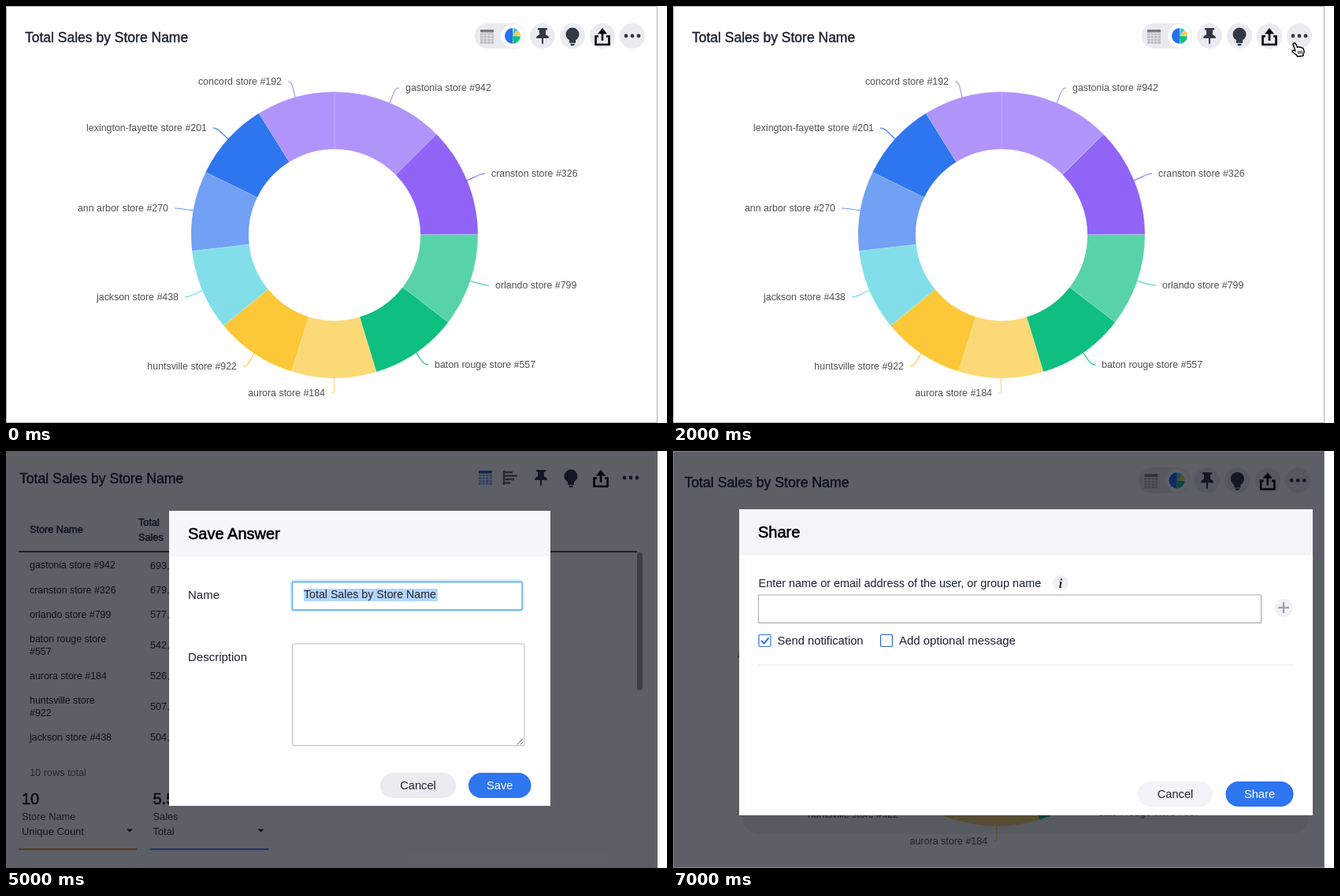
Recreate the animation shown at these times as an HTML page. Size 839 px wide and 530 px high, loop 8 s.

```html
<!DOCTYPE html>
<html lang="en">
<head>
<meta charset="utf-8">
<title>Save and share a chart</title>
<style>
html, body { margin: 0; width: 100%; height: 100%; overflow: hidden; background: #fff; }
svg { display: block; width: 839px; height: 530px; }
text { font-family: "Liberation Sans", Arial, sans-serif; fill: currentColor; white-space: pre; }
.medium { stroke: currentColor; stroke-width: .4px; }
.bold { stroke: currentColor; stroke-width: .6px; }
</style>
</head>
<body>
<svg id="stage" viewBox="0 0 839 530"></svg>
<script>
const INK = '#1d2233', ICON = '#323946', PALE = '#eaebf0', BLUE = '#2e75f0', GRAY = '#6b717e';
const CX = 417, CY = 291, R = 182, HOLE = 109;

// sales in thousands, colour, label, label x, label centre y
const stores = [
  [693, '#b094fa', 'gastonia store #942', 507, 104],
  [679, '#8f64f7', 'cranston store #326', 616, 213],
  [577, '#58d3a8', 'orlando store #799', 621, 355],
  [542, '#0ebf7f', 'baton rouge store #557', 544, 456],
  [526, '#fbd977', 'aurora store #184', 405, 492],
  [507, '#fcc838', 'huntsville store #922', 293, 458],
  [504, '#82dfe9', 'jackson store #438', 219, 370],
  [494, '#71a0f4', 'ann arbor store #270', 206, 257],
  [492, '#2e75f0', 'lexington-fayette store #201', 255, 155],
  [486, '#b094fa', 'concord store #192', 350, 96]
];
const total = stores.reduce((sum, [sales]) => sum + sales, 0);

const rect = (x, y, w, h, fill, more = '') =>
  `<rect x="${x}" y="${y}" width="${w}" height="${h}" fill="${fill}" ${more}/>`;
const circle = (x, y, r, fill) => `<circle cx="${x}" cy="${y}" r="${r}" fill="${fill}"/>`;
const fillPath = (d, fill) => `<path d="${d}" fill="${fill}"/>`;
const line = (d, stroke, width = 1, more = '') =>
  `<path d="${d}" fill="none" stroke="${stroke}" stroke-width="${width}" ${more}/>`;
const text = (x, middle, size, str, color = INK, more = '') =>
  `<text x="${x}" y="${middle + size * .35}" font-size="${size}" color="${color}" ${more}>${str}</text>`;
const group = (transform, content) => `<g transform="${transform}">${content}</g>`;
const zoom = (scale, x, y, content) => group(`translate(${x} ${y}) scale(${scale})`, content);
const MEDIUM = 'class="medium"', BOLD = 'class="bold"', CENTER = 'text-anchor="middle"';

function polar(angle, r, cx = CX, cy = CY) {
  const a = angle * Math.PI / 180;
  return [cx + r * Math.sin(a), cy - r * Math.cos(a)].map(v => v.toFixed(2)).join(' ');
}

function donut() {
  let from = 0, out = '';
  for (const [sales, color, label, x, y] of stores) {
    const to = from + 360 * sales / total, mid = (from + to) / 2;
    const right = mid < 180, side = right ? 1 : -1, endX = x - side * 8;
    out += `<path d="M${polar(from, R)}A${R} ${R} 0 0 1 ${polar(to, R)}L${polar(to, HOLE)}A${HOLE} ${HOLE} 0 0 0 ${polar(from, HOLE)}Z"
      fill="${color}" stroke="#fff" stroke-opacity=".3" stroke-width=".5"/>`;
    out += line(`M${polar(mid, R)}C${polar(mid, R + 13)} ${endX - side * 6} ${y} ${endX} ${y}`, color, 1.2);
    out += text(x, y, 12.4, label, '#505154', right ? '' : 'text-anchor="end"');
    from = to;
  }
  return out;
}

const tableIcon = (x, y, head, cells) => group(`translate(${x} ${y})`,
  rect(0, 0, 17, 3.5, head) +
  line('M0 6h17M0 9.6h17M0 13.2h17M0 16.6h17', cells, 2.6, 'stroke-dasharray="3.6 .87"'));

function pieIcon(x, y) {
  const wedge = (a, b, color) =>
    fillPath(`M${x} ${y}L${polar(a, 10, x, y)}A10 10 0 0 1 ${polar(b, 10, x, y)}Z`, color);
  return wedge(180, 360, '#2770ef') + wedge(5, 42, '#48c5e0') + wedge(46, 87, '#fcc838') + wedge(93, 176, '#0ebf7f');
}

// pin, bulb, export and dots
const actionIcons = dots =>
  fillPath('M675 28h12v2.5h-2v6q4 1 4 4.5h-16q0-3.5 4-4.5v-6h-2zM680 41h2v6l-1 2-1-2z', ICON) +
  circle(719, 36, 8.5, ICON) + fillPath('M715 42h8v5h-8zM716 48h6l-1.5 2.5h-3z', ICON) +
  line('M752 38.5h-3.5v10.5h17v-10.5h-3.5M757 44V32', '#000', 2.6) +
  fillPath('M757 28l6 7.5h-12z', '#000') +
  [787, 795, 803].map(x => circle(x, 38, 2.4, dots)).join('');

const frameLine = color => rect(.5, .5, 826, 529, 'none', `stroke="${color}"`);

const header = menuOpen =>
  text(24, 40, 17.5, 'Total Sales by Store Name', INK, MEDIUM) +
  rect(595, 22, 64, 32, PALE, 'rx="16"') + circle(643, 38, 15, '#fff') +
  tableIcon(602, 30, '#7b7d82', '#b9bbc0') + pieIcon(643, 38) +
  [681, 719, 757].map(x => circle(x, 38, 16, PALE)).join('') +
  circle(795, 38, 16, menuOpen ? ICON : PALE) + actionIcons(menuOpen ? '#fff' : ICON);

// icons are 16 px wide, drawn around 0,0
const menuItems = [
  ['Save', line('M-7.5-7.5h15v15h-15zM-4 0h8M0-4v8', GRAY, 1.8)],
  ['Copy and edit', rect(-3, -8, 11, 11, GRAY) + line('M-5-3h-2v10h10v-2', GRAY, 2)],
  ['Create view', line('M-7.5-7h15v14h-15zM-7.5-2.5h15M-2.5-7v14', GRAY, 1.8)],
  ['Delete', fillPath('M-6-7h3l1-1h4l1 1h3v2h-12zM-5-4h10l-1 12h-8z', GRAY)],
  ['Add formula', text(-7, -1, 18, 'f', GRAY, 'font-style="italic" class="bold"') + line('M0 2l6 6M6 2l-6 6', GRAY, 1.8)],
  ['Download', line('M0-8v10M-4.5-2l4.5 4.5 4.5-4.5M-6 7h12', GRAY, 1.8)],
  ['Replay search', line('M6-4a7.2 7.2 0 1 0 1 5', GRAY, 1.8) + fillPath('M-2-3.5l5 3.5-5 3.5zM8-6v5h-5z', GRAY)],
  ['Send feedback', fillPath('M8-7l-4 15-4-5-2 4-1-6-5-2z', GRAY)]
];

const menu = hover =>
  rect(628, 300, 181, 44, '#f1f1f2', 'rx="26" ry="16"') +
  rect(628, 68.5, 181, 265, '#fff', 'stroke="#e6e7ea" stroke-width=".7"') +
  (hover ? rect(628, 69, 181, 32, '#e4edfd') : '') +
  menuItems.map(([label, icon], i) =>
    group(`translate(655 ${85 + 32 * i})`, icon) + text(677, 85 + 32 * i, 14.7, label)).join('');

const shade = rect(0, 0, 827, 530, 'rgb(2,6,18)', 'fill-opacity=".64"');

const button = (x, y, w, label, fill, color) =>
  rect(x, y, w, 32, fill, 'rx="16"') + text(x + w / 2, y + 16, 14.7, label, color, CENTER);

const dialog = (x, y, w, h, head, title) =>
  rect(x, y, w, h, '#fff') + rect(x, y, w, 58.5, head) + text(x + 24, y + 28.5, 20, title, '#000', BOLD);

// long names wrap before the number and make the row taller
function tableRows() {
  let top = 129.5, out = '';
  for (const [sales, , label] of stores.slice(0, 7)) {
    const names = label.length > 19 ? label.split(/ (?=#)/) : [label];
    const height = 15.5 + 15.7 * names.length, y = top + height / 2;
    names.forEach((name, i) => {
      out += text(30, y + (i - (names.length - 1) / 2) * 15.7, 12.4, name, '#22262f');
    });
    out += text(183, y, 12.7, sales + ',', '#22262f');
    top += height;
  }
  return out;
}

function summary(x, value, name, kind, color) {
  return text(x + 4, 442, 20, value, INK, BOLD) + text(x + 4, 465, 12.8, name, '#3c404c') +
    text(x + 4, 483, 12.9, kind, '#2a2f3d') + fillPath(`M${x + 137} 480.5h8l-4 4z`, INK) +
    rect(x, 505, 151, 2.2, color);
}

const table =
  text(17, 35, 17.6, 'Total Sales by Store Name', INK, MEDIUM) +
  tableIcon(600, 25, '#2e5fc0', '#8fb0ee') +
  line('M632 25v18M632 27h11M632 31.5h17M632 36h13M632 40.5h8', '#666a74', 2.4) +
  group('translate(-2 -4)', actionIcons(ICON)) +
  text(30, 99.5, 12.7, 'Store Name', INK, MEDIUM) +
  text(168, 91, 12.7, 'Total', INK, MEDIUM) + text(168, 110, 12.7, 'Sales', INK, MEDIUM) +
  rect(16, 127, 785, 1.8, '#3a3f4c') + rect(801, 129, 7, 175, '#a0a2a8', 'rx="3"') +
  tableRows() + text(30, 409, 12.7, '10 rows total', '#5d616c') +
  summary(16, '10', 'Store Name', 'Unique Count', '#e0a032') +
  summary(182.5, '5.50M', 'Sales', 'Total', '#5c8df6');

const saveDialog =
  dialog(207, 76, 484, 375, '#f6f7f9', 'Save Answer') +
  text(231, 183, 15, 'Name') + text(231, 262, 15, 'Description') +
  rect(363, 166, 292, 36, 'none', 'rx="3" stroke="#b5dafb" stroke-width="5" stroke-opacity=".6"') +
  rect(363.5, 166.5, 291.5, 35.5, '#fff', 'rx="2" stroke="#58a6ee" stroke-width="1.3"') +
  rect(378, 175, 170, 16, '#b4d6fc') + text(378, 182.5, 14.2, 'Total Sales by Store Name') +
  rect(363.5, 245, 294.5, 129.5, '#fff', 'rx="2" stroke="#b8b9bc"') +
  line('M649 373l7-7M653 373l3-3', '#666', 1) +
  button(475, 409, 96, 'Cancel', PALE, INK) + button(587, 409, 79.5, 'Save', BLUE, '#fff');

const shareDialog =
  rect(88, 400, 719, 87, '#000', 'rx="22" fill-opacity=".05"') +
  dialog(84, 74, 728, 389, '#f4f5f9', 'Share') +
  text(108.5, 168, 14.45, 'Enter name or email address of the user, or group name') +
  circle(492, 168, 10, '#f0f1f5') +
  `<text x="492" y="173.5" color="${INK}" text-anchor="middle"
    style="font:italic bold 16px 'Liberation Serif',serif">i</text>` +
  rect(108.5, 183, 638, 35.5, '#fff', 'stroke="#a5a6a9"') +
  circle(775, 199, 11.5, '#f0f1f4') + line('M768 199h14M775 192v14', '#a3a7af', 2.4) +
  rect(109, 233.5, 15, 15, '#fff', `rx="1.5" stroke="${BLUE}" stroke-width="1.2"`) +
  line('M112 241l3.5 3.5 6-7', BLUE, 2) +
  text(132.5, 241, 14.75, 'Send notification') +
  rect(263.5, 233.5, 15, 15, '#fff', 'rx="1.5" stroke="#2a62c4" stroke-width="1.2"') +
  text(287, 241, 14.95, 'Add optional message') +
  rect(108, 271.5, 680, 1, '#e6e8ec') +
  button(590, 420, 95, 'Cancel', '#f3f4f7', INK) + button(701.5, 420, 86, 'Share', BLUE, '#fff');

const hand = (x, y, scale = 1) => zoom(scale, x, y,
  `<path d="M3 1.2Q4.6.6 5.4 2L7.6 6.6Q9 5.4 10.3 6.6Q11.8 5.8 12.8 7.2Q14.6 6.8 15.4 8.6L16.2 12.4L14.9 15.4L15 17.2L7.4 18.2L6.6 16.4L1.2 12.3Q.4 10.6 2.2 10.1L5 11L2.1 3.2Q1.8 1.8 3 1.2Z"
    fill="#fff" stroke="#000" stroke-width="1.4" stroke-linejoin="round"/>` +
  line('M8.4 11l.8 4M10.6 10.8l.7 4M12.8 10.6l.5 4', '#000'));

const plain = header(false) + donut() + frameLine('#b0b0b0');
const opened = zoom(1.006, -7.1, -3.2, header(true)) + zoom(1.004, -6, -4, donut()) + frameLine('#b0b0b0');
const saving = table + shade + saveDialog;
const sharing = zoom(1.01, -9.8, -1, header(false) + donut()) + shade + frameLine('#85878d') + shareDialog;

// one scene per second
const scenes = [
  plain,
  plain + hand(431, 81),
  plain + hand(785, 46),
  opened + menu(false) + hand(791, 40, 1.4),
  opened + menu(true) + hand(714, 86, 1.4),
  saving,
  saving + hand(623, 430),
  sharing
];

const stage = document.getElementById('stage');
let shown = -1;
function draw() {
  const index = Math.floor(performance.now() / 1000) % scenes.length;
  if (index !== shown) stage.innerHTML = scenes[shown = index];
  requestAnimationFrame(draw);
}
draw();
</script>
</body>
</html>
```
